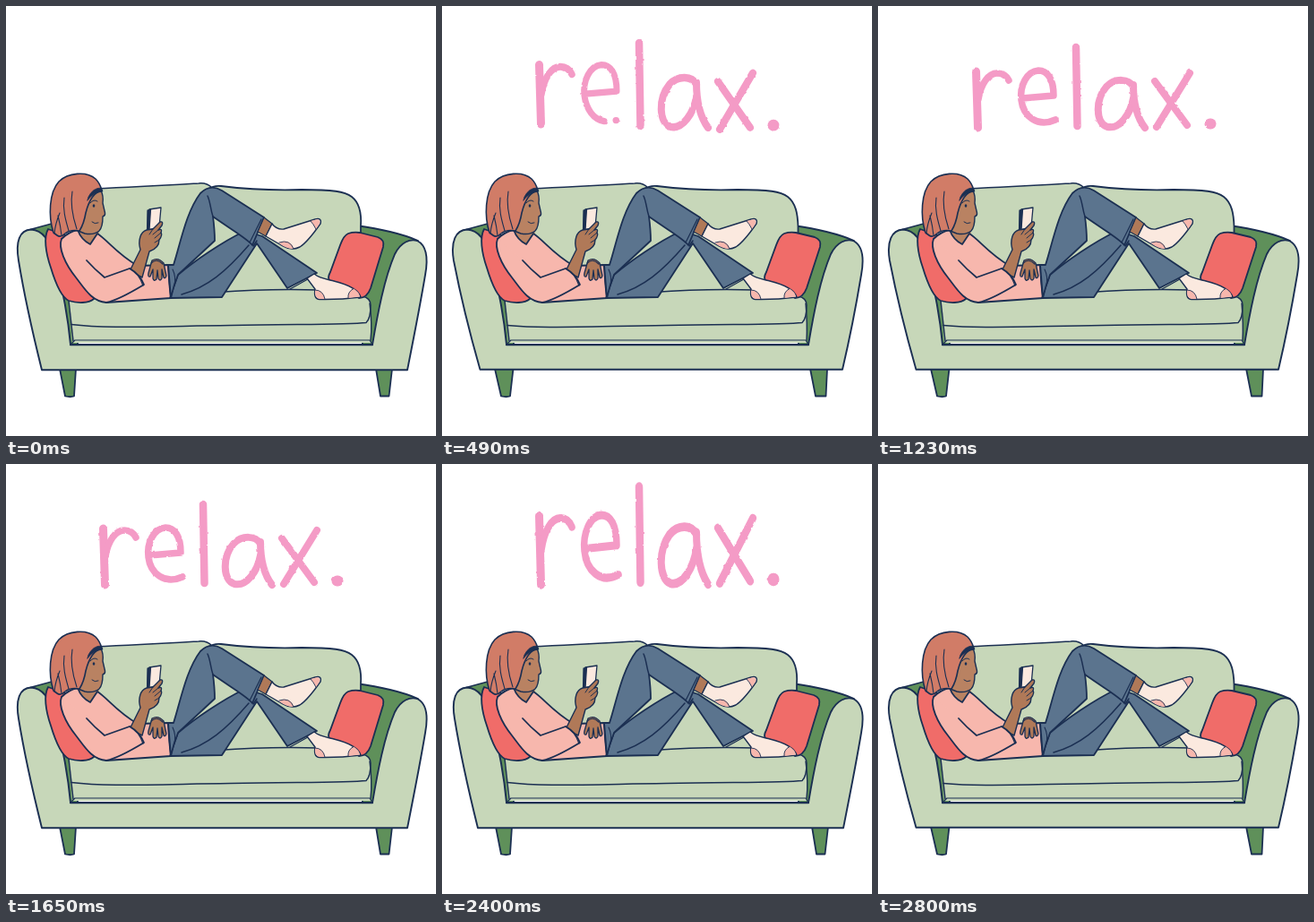
Write an HTML page that moves like this. It is 480x480 px and loops after 2970 ms.

```html
<!DOCTYPE html>
<html lang="en">
<head>
<meta charset="utf-8">
<title>relax.</title>
<style>
html, body { margin: 0; width: 100%; height: 100%; overflow: hidden; background: #fff; }
svg { display: block; width: 100vw; height: 100vh; }
path { stroke-linecap: round; stroke-linejoin: round; }
#word { fill: none; stroke: #f49bc6; }
</style>
</head>
<body>
<svg viewBox="0 0 480 480" role="img" aria-label="relax.">
  <defs>
    <filter id="chalk" x="80" y="0" width="320" height="170" filterUnits="userSpaceOnUse" color-interpolation-filters="sRGB">
      <feTurbulence id="grain" type="fractalNoise" baseFrequency=".16" numOctaves="2" seed="1"/>
      <feDisplacementMap in="SourceGraphic" scale="2.2" xChannelSelector="R" yChannelSelector="G"/>
    </filter>
  </defs>
  <g id="scene"></g>
  <g filter="url(#chalk)"><g id="word"></g></g>
</svg>
<script>
const LOOP = 2970;
const $ = id => document.getElementById(id);
const C = {
  line: '#1b2f52', sofa: '#c7d7b9', deep: '#5f905a', red: '#f06c69', hijab: '#d17c67',
  shirt: '#f7b7ad', face: '#b98262', skin: '#b07958', jeans: '#5b748e', sock: '#fbe9df'
};
const shape = (d, fill = 'none', w = 1.8, stroke = C.line) =>
  `<path d="${d}" fill="${fill}" stroke="${stroke}" stroke-width="${w}"/>`;
const line = (d, w = 1.5) => shape(d, 'none', w);
const blob = (d, fill) => shape(d, fill, 0, 'none');

// k: 0..1 drift of the redrawn outline, low: extra leg length
function sofaBack(k, low) {
  const legs = [
    `M${60 - k} 405L66 ${435.5 + low}Q72 ${437 + low} 76 ${435.5 + low}L${78 + 1.5 * k} 405Z`,
    `M${413 - 2 * k} 405L${418 - k} ${435.5 + low}L${427.5 + k} ${435.5 + low}L${431 - k} 405Z`
  ];
  const corner = 396 + 1.5 * k;
  const right = `Q232 200 240 201C265 204 300 206 330 205C365 205 378 207 386 213C395 220 397 232 ${corner} 246`;
  return legs.map(d => shape(d, C.deep)).join('') +
    shape('M27 249.5L51 243L80 300V378H71Z', C.deep) +
    shape(`M${corner - 6} 245C420 249 444 255 460 262L440 290L410 378H398Z`, C.deep) +
    blob(`M72 330L90 204L105 203.500C150 202 190 199.500 215 198Q224 197 230 203${right}L402 330Z`, C.sofa) +
    line('M98 204C150 202 190 199.500 215 198Q224 197 230 203') +
    line(`M225 205${right}V256`, 1.8);
}

function sofaFront(k) {
  const l = 40 + 2.5 * k, y = 406.300 - .6 * k, r = 448 - k;
  const armL = `C${29 + k} 362 19 315 ${14 - k} 284C${10.5 - k} 263 15 250 28 249.500C41 250 50 264 55 283C63 315 69 345 72 378`;
  const armR = `C415 343 422 305 434 277C441 263 451 260 459 262C469 267 471.500 281 468 300C462 336 454 376 ${r} ${y}`;
  return blob('M70 330Q71 326 80 327L240 319L345 316L398 324Q407 326 407 334V376H74Z', C.sofa) +
    line('M70 329L75 374') +
    line('M236 319.500C270 317 310 316 350 317') +
    line(`M73 ${355.5 + k}C110 360 150 358 250 356.500C320 355 380 356 402 353.500Q407 349 407 334Q407 326 398 324`) +
    line('M72 378L77 373H406L409 378', 1.2) +
    line(`M406 332Q${409 - k} 355 407 373`, 1.4) +
    shape(`M${l} ${y}${armL}L409 378${armR}Z`, C.sofa, 1.9) +
    line('M72 378.200H409', 2.2);
}

const pillows = k =>
  shape('M47 249C42 258 44 275 50 292C56 312 62 325 70 329C80 332 92 332 98 327L84 262Z', C.red) +
  shape(`M382 254Q388 252 395 253L${415 + k} 258Q${423 + k} 261 ${421 + k} 269L407 315Q403 326 394 326L362 307Q358 304 362 297L373 267Q377 256 382 254Z`, C.red);

const legs = () =>
  // far leg
  shape('M183 326L192 300C210 285 240 264 267 251L286 257L347 298L314 315L280 265L241 325Z', C.jeans) +
  line('M196 322C225 314 246 296 271 267') +
  line('M344 301L317 316', 1.4) +
  // raised leg
  shape('M181 289H187C195 264 201 230 217 209Q228 198 241 206L288 236L275 267C270 260 252 250 231 235Q233 250 233 262L192 300Q187 312 184 326Z', C.jeans) +
  line('M231 235C228 226 228 218 225 212') + line('M186 294Q190 302 188 312', 1.1) +
  line('M285 238L272 264', 1.2) + line('M280 262L276 268');

const feet = () =>
  shape('M288 236L297 243L290 257L281 252Z', C.skin, 1.3) +
  shape('M297 243Q302 250 310 249L345 238Q353 236 351 243C344 253 336 264 328 269C320 273 314 271 309 268L290 257Z', C.sock, 1.4) +
  blob('M340 240L346 238.500Q351 237.500 350 243L346 249Q343 243 340 240Z', C.shirt) +
  blob('M305 265Q311 261 316 264Q321 267 321 271Q313 271 305 265Z', C.shirt) +
  line('M340 240Q343 243 346 249M305 264Q317 260 321 271', .9) +
  shape('M336 304L344 299C350 304 358 305 366 307C378 310 393 315 396 325Q372 328 350 327.500Q343 327 345 316Z', C.sock, 1.4) +
  blob('M382 326Q381 319 388 315.500Q394 319 395 324.500Z', C.shirt) +
  blob('M345 317Q354 317 356 327L350 327Q344 326 345 317Z', C.shirt) +
  line('M382 326Q381 319 388 315.500M345 317Q354 317 356 327', .9);

const body = () =>
  blob('M80 246L104 248L103 262L94 268L80 258Z', C.face) +
  shape('M62 260Q70 252 80 250Q84 261 94 266L102 254C113 261 124 277 147 290L181 289Q182 310 184 326L112 331C90 318 60 285 62 260Z', C.shirt) +
  // hand resting on the belly
  shape('M163 284Q170 280 176 287L179 301Q178 305 176 303L174 294L174 304Q172 308 170 304L169 295L168 305Q165 308 164 304L164 294L161 302Q158 303 159 298Z', C.skin, 1.3) +
  line('M162 287Q168 281 175 288', 1.2) +
  // phone and raised forearm
  shape('M160 227L173 225L171 247L159 250Z', C.sock, 1.3) +
  shape('M158 228L161.500 227L160 250L157.500 251Z', C.line, 1.2) +
  shape('M138 296L150 272C147 262 150 252 157 250L164 249L172 241Q176 240 174 245L170 250Q175 248 173 253Q175 256 171 261C171 268 166 272 160 274L152 303Z', C.skin, 1.4) +
  line('M164 249L160 255M170 250L164 255M173 253L166 259M171 261L166 264', 1) +
  // sleeve
  shape('M62 260C58 270 66 288 78 303C88 316 96 330 112 331Q126 328 154 311Q150 300 138 293L110 303Q99 294 90 284', C.shirt) +
  line('M138 293Q148 298 153 312', 1.3);

const head = () =>
  shape('M92 208L106 206Q109 212 108 220L110.500 231Q111 234 108 235Q108 247 104 251Q98 256 88 254L78 250Z', C.face, 1.4) +
  shape('M53 253C47 235 48 208 59 196C69 186 90 184 100 193Q105 198 107 206C97 208 92 219 89 231Q87 243 82 251Q72 249 66 254Q61 259 57 256Z', C.hijab, 1.6) +
  shape('M92 213Q97 203 106 203L108 207Q97 208 91 217Z', C.line, .8) +
  line('M60 231Q55 243 54 254M58 234Q61 246 62 256M65 214C63 228 67 240 70 251M74 207C71 224 76 240 79 249', 1.1) +
  line('M94 220Q98 215 102 218M96 241Q99 244 103 242', 1) +
  '<ellipse cx="98" cy="223" rx="1.300" ry="1.700" fill="#1b2f52"/>';

const scene = (k, low) =>
  sofaBack(k, low) + sofaFront(k) + pillows(k) + body() + legs() + feet() + head();

const poses = [[0, 0], [.5, 1], [1, 0]].map(([k, low]) => {
  const g = document.createElementNS('http://www.w3.org/2000/svg', 'g');
  g.innerHTML = scene(k, low);
  $('scene').append(g);
  return g;
});

// letters as [path, stroke width], drawn on a baseline near y = 138
const BASE = 138;
const eBowl = 'M160 102L195 99C195 80 188 71 178 71C165 72 157 88 159 104';
const glyphs = [
  [['M108.500 72L110.500 135', 9], ['M111 103C114 86 122 74 132 74Q141 74 145 82', 7.5]],
  [[eBowl + 'C161 122 177 135 197 126', 7.5]],
  [['M220 45L221.500 133', 8.5]],
  [['M284 89C279 80 264 79 254 89C241 104 242 130 255 134C269 137 281 119 284 102', 8],
   ['M284 87C284 105 287 122 297 135', 8]],
  [['M308 83L344 132', 8], ['M347 74L310 134', 8]],
  [['M369.500 130.500H370.500', 12]]
];
const broken = [[eBowl + 'C161 118 169 129 181 131', 7], ['M194 130H194.500', 7]];
const still = [0, 0, 0, 0, 0, 0];
const uneven = [-3, -2, 1, 1, 4, 3];

// start, height, drift, letter shifts
const steps = [
  [0, 0], [250, .16, 0], [330, .62, 0], [410, 1.22, 0], [490, 1.05, 0, uneven],
  [570, .93, 1], [650, .97, 1], [730, 1, 2],
  [900, 1, 0], [1150, 1, 1], [1400, 1, 2], [1650, 1, 0], [1900, 1, 1], [2150, 1, 2],
  [2400, 1.21, 0], [2480, 1.1, 0], [2560, .78, 0], [2640, .45, 0], [2720, .16, 0], [2800, 0]
];
// outline drawing in use from each time on
const boil = [0, 250, 490, 730, 980, 1230, 1480, 1730, 1980, 2230, 2480, 2720];

function drawWord([, h, drift = 0, shifts = still], n) {
  $('grain').setAttribute('seed', n % 3 + 1);
  $('word').innerHTML = h ? glyphs.map((parts, i) => {
    const list = i === 1 && shifts === uneven ? broken : parts;
    const y = BASE + drift + shifts[i];
    return `<g transform="translate(${drift} ${y}) scale(1 ${h}) translate(0 ${-BASE})">` +
      list.map(([d, w]) => `<path d="${d}" stroke-width="${w}"/>`).join('') + '</g>';
  }).join('') : '';
}

let lastStep = -1, lastPose = -1;
function draw(now) {
  const t = now % LOOP;
  const step = steps.findLastIndex(s => s[0] <= t);
  const pose = boil.findLastIndex(s => s <= t) % 3;
  if (step !== lastStep) drawWord(steps[step], step);
  if (pose !== lastPose) poses.forEach((g, i) => g.style.display = i === pose ? '' : 'none');
  lastStep = step;
  lastPose = pose;
}

const start = performance.now();
const tick = () => {
  draw(Math.max(0, performance.now() - start));
  requestAnimationFrame(tick);
};
tick();
</script>
</body>
</html>
```
